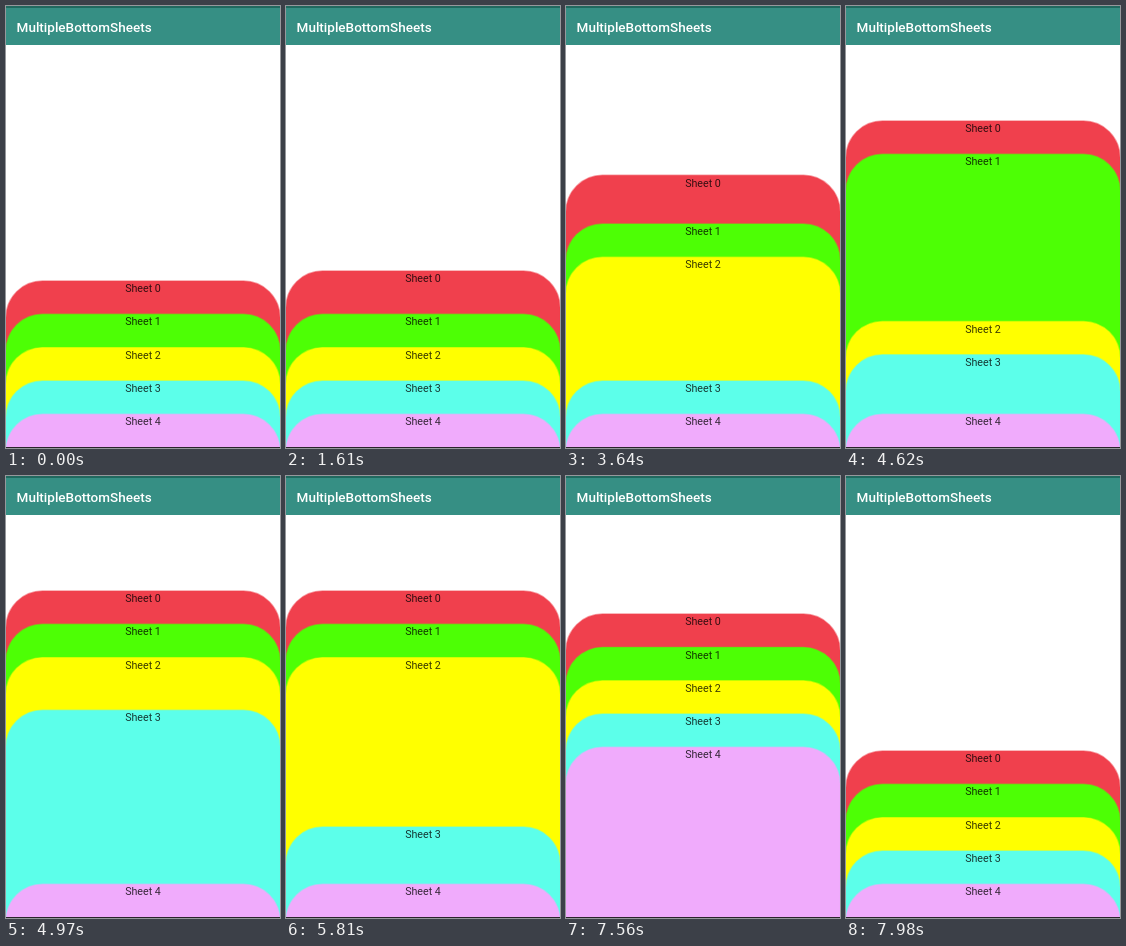
Animation of 274 by 442 pixels, one loop 8 s. Source, as an HTML page:

```html
<!DOCTYPE html>
<html lang="en">
<head>
<meta charset="utf-8">
<title>Bottom sheets</title>
<style>
  html, body { margin: 0; width: 100%; height: 100%; overflow: hidden; background: #fff; }
  svg { display: block; width: 100vw; height: 100vh; }
  text { font-family: Roboto, "Noto Sans", sans-serif; }
  .title { font-size: 13.5px; font-weight: 500; fill: #fff; }
  .label { font-size: 10.7px; fill: #000; fill-opacity: .78; text-anchor: middle; }
  .sheet path { stroke-width: 1.4; stroke-opacity: .5; }
</style>
</head>
<body>
<svg id="stage" viewBox="0 0 274 442">
  <rect width="274" height="442" fill="#fff"/>
  <rect width="274" height="39" fill="#368f84"/>
  <rect width="274" height="2" fill="#21695f"/>
  <text class="title" x="10.6" y="26">MultipleBottomSheets</text>
  <g id="sheets"></g>
  <rect y="441" width="274" height="1" fill="#2b242c"/>
</svg>
<script>
const LOOP = 8000, STEP = 70;
const FIRST_TOP = 275, PEEK = 33.3, RADIUS = 36.5;
const RISE = 160, SLIDE_TIME = 460, COLLAPSE_START = 7450;

const up = (start, distance = RISE) => ({ start, distance });
const down = start => up(start, -RISE);

// A lifted sheet carries the next one along, which then falls back.
const sheets = [
  { color: '#f0404d', slides: [up(1540), down(2163), up(3360)] },
  { color: '#4dff05', slides: [up(3390)] },
  { color: '#ffff00', slides: [up(3390), down(3780), up(4502)] },
  { color: '#5cffea', slides: [up(4502), down(4870), up(5695, 153), up(6510, 7)] },
  { color: '#f0abfc', slides: [up(6206)] }
];

function create(name, attributes, parent) {
  const node = document.createElementNS('http://www.w3.org/2000/svg', name);
  for (const key in attributes) node.setAttribute(key, attributes[key]);
  return parent.appendChild(node);
}

function ease(time, start) {
  const u = Math.min(1, Math.max(0, (time - start) / SLIDE_TIME));
  return u * u * (3 - 2 * u);
}

const raised = (slides, time) =>
  slides.reduce((sum, { start, distance }) => sum + distance * ease(time, start), 0);

const layer = document.getElementById('sheets');
const outline = `M0 450V${RADIUS}A${RADIUS} ${RADIUS} 0 0 1 ${RADIUS} 0` +
  `H${274 - RADIUS}A${RADIUS} ${RADIUS} 0 0 1 274 ${RADIUS}V450Z`;

sheets.forEach((sheet, i) => {
  sheet.slides.push(down(COLLAPSE_START));
  sheet.node = create('g', { class: 'sheet' }, layer);
  create('path', { d: outline, fill: sheet.color, stroke: sheet.color }, sheet.node);
  create('text', { class: 'label', x: 137, y: 11.2 }, sheet.node).textContent = 'Sheet ' + i;
});

function render(time) {
  const stepped = Math.floor(time / STEP) * STEP;
  sheets.forEach((sheet, i) => {
    const top = FIRST_TOP + i * PEEK - raised(sheet.slides, stepped);
    sheet.node.setAttribute('transform', `translate(0 ${top.toFixed(2)})`);
  });
}

const start = performance.now();
function tick() {
  render((performance.now() - start) % LOOP);
  requestAnimationFrame(tick);
}
render(0);
requestAnimationFrame(tick);
</script>
</body>
</html>
```
